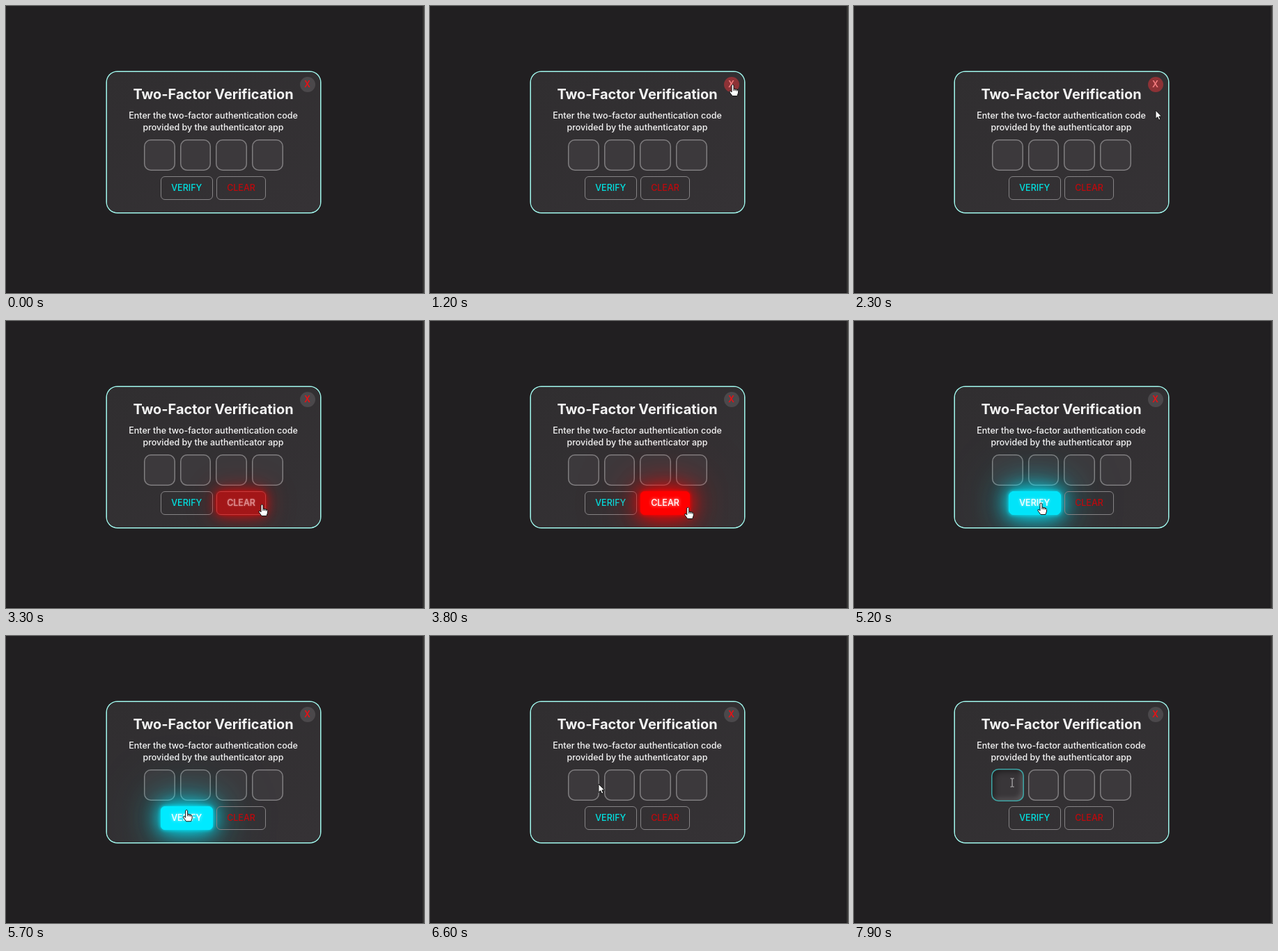
Animation of 600x413 px, one loop 8000 ms. Source, as an HTML page:

```html
<!DOCTYPE html>
<html lang="en">
<head>
<meta charset="utf-8">
<title>Two-Factor Verification</title>
<style>
  html, body { margin: 0; width: 100%; height: 100%; overflow: hidden; background: #211f21; }
  body { position: relative; font: 500 12.5px Inter, "Open Sans", sans-serif; color: #f4f4f4; }
  body * { position: absolute; box-sizing: border-box; margin: 0; text-align: center; white-space: nowrap; }
  #stage { width: 600px; height: 413px; overflow: hidden; }
  #right { left: 598px; width: 2px; height: 413px; background: #353433; }
  #bottom { top: 412px; width: 598px; height: 1px; background: #181618; }
  #card { left: 144.5px; top: 94.5px; width: 306.5px; height: 202.5px; border-radius: 15px;
    background: linear-gradient(150deg, #302e30, #353235); box-shadow: 0 0 0 1.5px #a2f8ee; }
  /* keeps the button glow inside the card */
  #panel { inset: 0; clip-path: inset(94.5px 149px 116px 144.5px round 15px); }
  h1 { left: 143px; top: 115px; width: 309px; font-size: 19.9px; font-weight: 700; line-height: 24px; }
  p { left: 143px; top: 148.5px; width: 309px; line-height: 17.6px; }
  .cell { top: 192px; width: 44.5px; height: 44.5px; border-radius: 10px; background: #3c393c;
    box-shadow: inset 0 0 0 1.5px #7f7d7f; }
  .btn { top: 245px; height: 34px; line-height: 32px; border: 1px solid; border-radius: 6px; }
  #verify { left: 222px; width: 74.5px; }
  #clear { left: 302px; width: 71px; }
  #close { left: 421.5px; top: 102px; width: 22px; height: 22px; line-height: 22px; border-radius: 50%; font-weight: 600; }
  #pointer { left: 0; top: 0; overflow: visible; }
  #pointer path { fill: #fff; stroke: #111; stroke-width: 1; stroke-linejoin: round; }
  #pointer #beam { fill: none; stroke: #c8c8c8; }
</style>
</head>
<body>
<div id="stage">
  <div id="right"></div>
  <div id="bottom"></div>
  <div id="card"></div>
  <h1>Two-Factor Verification</h1>
  <p>Enter the two-factor authentication code<br style="position:static">provided by the authenticator app</p>
  <div id="panel">
    <div class="cell" style="left:198px"></div>
    <div class="cell" style="left:249.7px"></div>
    <div class="cell" style="left:301.3px"></div>
    <div class="cell" style="left:353px"></div>
    <div id="verify" class="btn">VERIFY</div>
    <div id="clear" class="btn">CLEAR</div>
  </div>
  <div id="close">X</div>
  <svg id="pointer" width="20" height="24">
    <path id="arrow" d="M0 0V12.2L2.8 9.6L4.7 14L6.8 13L4.9 8.8H8.6Z"/>
    <path id="hand" d="M-1 2Q.5 0 2 2V7L6.5 8Q8.5 8.5 8.5 10.5V13L7 17.5H0L-4 12Q-4.5 10 -2.7 10.3L-1 12ZM2 7V10M4.2 7.6V10.2M6.4 8V10.5"/>
    <path id="beam" d="M-2.5 -6H-.5L0 -5.5L.5 -6H2.5M0 -5.5V5.5M-2.5 6H-.5L0 5.5L.5 6H2.5"/>
  </svg>
</div>
<script>
const LOOP = 8000, FADE = 500;
const $ = id => document.getElementById(id);
const cell = document.querySelector('.cell');

// pointer path: time, x, y
const path = [
  [100, 490, 5], [900, 448, 101], [1200, 434, 112], [2000, 434, 116], [2150, 434, 126],
  [2300, 433, 150], [2700, 415, 205], [3150, 372, 252], [3300, 367, 263], [3700, 367, 264],
  [3960, 374, 272], [4300, 386, 292], [4600, 370, 292], [4700, 300, 286], [4800, 285, 274],
  [5200, 268, 261], [5500, 266, 260], [5800, 255, 244], [6200, 245, 225], [6600, 242, 213],
  [7000, 228, 211], [8000, 227, 211]
];
const hover = { close: [1080, 2150], clear: [3150, 3960], verify: [4800, 5800] };
const focusAt = 7050;

const clamp = v => Math.min(1, Math.max(0, v));
const ease = u => 1 - (1 - clamp(u)) ** 2.2;
const mix = (a, b, p) => `rgb(${a.map((v, i) => v + (b[i] - v) * p).join()})`;
const level = (t, [on, off]) => t < off ? ease((t - on) / FADE) : 1 - ease((t - off) / FADE);

function pointerAt(t) {
  const i = Math.max(1, path.findIndex(k => k[0] > t));
  const [t0, x0, y0] = path[i - 1], [t1, x1, y1] = path[i];
  const u = clamp((t - t0) / (t1 - t0));
  return [x0 + (x1 - x0) * u, y0 + (y1 - y0) * u];
}

function paintButton(id, ink, glow, p) {
  const s = $(id).style, rgb = glow.join();
  const halo = (blur, alpha) => `0 0 ${blur * p}px rgba(${rgb},${alpha * p})`;
  s.background = `rgba(${rgb},${p})`;
  s.borderColor = mix([133, 131, 133], glow, p);
  s.color = mix(ink, [255, 255, 255], p);
  s.textShadow = `0 0 ${4 * p}px rgba(255,255,255,${.8 * p})`;
  s.boxShadow = [halo(5, 1), halo(25, 1), halo(50, 1), halo(100, .35)].join();
}

function draw(t) {
  paintButton('verify', [0, 226, 226], [0, 234, 255], level(t, hover.verify));
  paintButton('clear', [192, 8, 12], [255, 0, 0], level(t, hover.clear));

  const c = level(t, hover.close);
  $('close').style.background = mix([75, 72, 75], [220, 24, 28], c);
  $('close').style.color = mix([235, 16, 20], [255, 255, 255], c);

  const f = ease((t - focusAt) / FADE);
  cell.style.transform = `scale(${1 + .045 * f})`;
  cell.style.background = mix([60, 57, 60], [57, 54, 57], f);
  cell.style.boxShadow = `inset 0 0 0 1.5px ${mix([127, 125, 127], [62, 164, 164], f)},
    inset 4px 4px 8px rgba(0,0,0,${.45 * f}), inset -4px -4px 7px rgba(255,255,255,${.16 * f})`;

  const [x, y] = pointerAt(t);
  const over = Object.values(hover).some(([on, off]) => t >= on && t < off);
  const kind = over ? 'hand' : t > 6640 ? 'beam' : 'arrow';
  for (const id of ['arrow', 'hand', 'beam']) $(id).style.display = id === kind ? '' : 'none';
  $('pointer').style.display = t < 100 ? 'none' : '';
  $('pointer').style.transform = `translate(${x}px,${y}px)`;
}

const start = performance.now();
function tick() {
  draw((performance.now() - start) % LOOP);
  requestAnimationFrame(tick);
}
tick();
</script>
</body>
</html>
```
